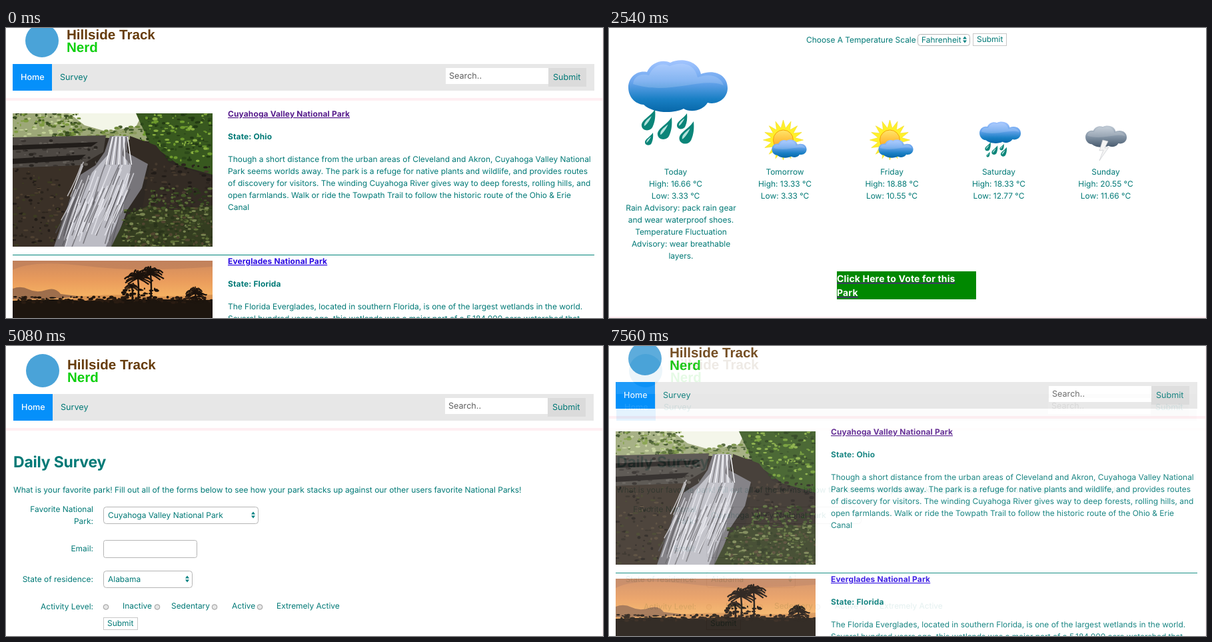
Recreate the animation shown at these times as an HTML page. Size 896 by 435 pixels, loop 7620 ms.

```html
<!DOCTYPE html>
<html lang="en">
<head>
<meta charset="utf-8">
<title>Park pages</title>
<style>
html, body { margin: 0; width: 100%; height: 100%; overflow: hidden; background: #fff; }
svg { display: block; }
text { font: 11.95px Inter, sans-serif; fill: #007976; text-rendering: geometricPrecision; white-space: pre; }
.bold, .link { font-weight: 700; letter-spacing: .15px; }
.link { text-decoration: underline; }
.nav { font-size: 12.6px; }
.brand { font: bold 20.6px "Liberation Sans", Arial, sans-serif; }
.vote { font-size: 14px; font-weight: 700; letter-spacing: .15px; fill: #551a8b; text-decoration: underline; }
.vote tspan { fill: #fff; }
.title { font-size: 23px; font-weight: 700; letter-spacing: -.2px; }
.mid { text-anchor: middle; }
.end { text-anchor: end; }
</style>
</head>
<body>
<svg id="stage" width="896" height="435"></svg>
<script>
let seed = 7;
const random = () => (seed = (seed * 16807) % 2147483647) / 2147483647;
const times = (n, make) => Array.from({ length: n }, (_, i) => make(i)).join('');

const rect = (x, y, w, h, fill, more = '') =>
  `<rect x="${x}" y="${y}" width="${w}" height="${h}" fill="${fill}" ${more}/>`;
const path = (d, fill, more = '') => `<path d="${d}" fill="${fill}" ${more}/>`;
const text = (x, y, s, cls = '', style = '') =>
  `<text x="${x}" y="${y}" class="${cls}" style="${style}"><tspan>${s}</tspan></text>`;
const lines = (x, y, list, cls, step = 18) =>
  list.map((s, i) => text(x, y + i * step, s, cls)).join('');
const place = (x, y, scale, body) =>
  `<g transform="translate(${x} ${y}) scale(${scale})">${body}</g>`;
const gradient = (id, ...stops) =>
  `<linearGradient id="${id}" x2="0" y2="1">${stops.map(([at, color]) =>
    `<stop offset="${at}" stop-color="${color}"/>`).join('')}</linearGradient>`;

// Form parts
const frame = (x, y, w, h, r, color) =>
  rect(x + .5, y + .5, w - 1, h - 1, '#fff', `rx="${r}" stroke="${color}"`);
const button = (x, y, w) => frame(x, y, w, 19, 0, '#c8c8c8') + text(x + 6, y + 13, 'Submit');
const select = (x, y, w, h, label) => frame(x, y, w, h, 4, '#b5b5b5') +
  text(x + (h > 20 ? 7 : 6), y + h / 2 + 4, label) +
  place(x + w - 8, y + h / 2 - .5, 1, path('M-3-1L0-5L3-1ZM-3 1L0 5L3 1Z', 'teal'));

const header = (x, y, right) =>
  `<circle cx="${x + 44}" cy="${y + 19}" r="25" fill="#4aa3d8"/>` +
  text(x + 81, y + 17, 'Hillside Track', 'brand', 'fill:#663c0c') +
  text(x + 81, y + 36, 'Nerd', 'brand', 'fill:#10d010') +
  rect(x, y + 54, right - x, 40, '#e7e7e7') +
  rect(x, y + 54, 59, 40, '#0590fa') +
  text(x + 12, y + 78, 'Home', 'nav', 'fill:#fff;font-weight:500') +
  text(x + 71, y + 78, 'Survey', 'nav') +
  rect(right - 223, y + 60, 154, 24, '#fff') +
  text(right - 218, y + 76, 'Search..', 'nav', 'fill:#606060') +
  rect(right - 69, y + 60, 57, 28, '#dbdbdb') +
  text(right - 62, y + 78, 'Submit', 'nav') +
  rect(0, y + 105, 896, 4, '#ffeef2') + rect(895, 0, 1, 435, '#fff0f3');

// Pictures
const leaves = (n, x, y, w, h, colors) => times(n, i =>
  `<ellipse cx="${(x + random() * w).toFixed(1)}" cy="${(y + random() * h).toFixed(1)}" rx="${(1 + random() * 3).toFixed(1)}" ry="${(.8 + random() * 1.5).toFixed(1)}" fill="${colors[i % colors.length]}"/>`);
const photo = (x, y, h, body) => `<svg x="${x}" y="${y}" width="300" height="${h}">${body}</svg>`;

const waterfall = () => photo(10, 128, 200,
  rect(0, 0, 300, 200, '#2e2823') +
  path('M0 0H205V42L120 35L0 40Z', '#9da878') +
  path('M85 0H195L185 20L140 27L108 18Z', '#f3f6e8') +
  leaves(130, 0, 0, 100, 36, ['#566f2c', '#7f9c40', '#34491d', '#c3d098']) +
  leaves(60, 90, 20, 105, 14, ['#43592a', '#6f8a3a', '#8b9a5c']) +
  path('M185 0H300V92L250 78L205 44Z', '#38581f') +
  leaves(190, 192, 0, 106, 72, ['#6d9a2d', '#2c481a', '#86ad3f', '#233a14']) +
  path('M0 36L140 33L136 58L102 78L0 82Z', '#4d4843') +
  leaves(70, 0, 38, 128, 42, ['#2a2622', '#625d57', '#393430']) +
  path('M0 48L128 43L118 50L0 55ZM0 68L110 62L100 70L0 76Z', '#211d1a') +
  path('M176 34L215 48L235 74L300 96V148L195 140L205 82L174 58Z', '#332b24') +
  leaves(80, 198, 74, 100, 70, ['#211c18', '#463a2e', '#2b241e']) +
  path('M0 82L102 78L78 150L62 200H0Z', '#3a3027') +
  leaves(110, 0, 84, 76, 114, ['#211b17', '#4f4131', '#2b241d', '#3c3b22']) +
  path('M146 34H174L170 58L203 76L194 112L172 145L152 200H62L82 142L102 92L124 78L138 58Z', '#77757a') +
  path('M151 34H171L164 62L178 78L165 145L140 200H78L100 130L119 89L143 62Z', '#bcbcc4') +
  times(60, i => {
    const x = 106 + i * 1.5, y = 70 + random() * 70;
    const lean = (y - 70) * .42;
    return path(`M${x - lean} ${y}q-9 ${18 + random() * 10}-${18 + random() * 6} ${45 + random() * 25}`,
      'none', `stroke="${i % 5 < 3 ? '#f4f5fa' : '#57555a'}" stroke-opacity=".65" stroke-width="1.6"`);
  }) +
  times(9, i => path(`M${150 + i * 2.8} 35l${i * 2 - 10} 42`, 'none',
    `stroke="${i % 2 ? '#77757a' : '#fafafd'}" stroke-width="1.5"`)) +
  path('M300 138L240 145L205 138L172 152L148 200H300Z', '#343d20') +
  leaves(300, 166, 142, 134, 58, ['#5f7038', '#29331a', '#788450', '#514630', '#3d4a25']) +
  leaves(90, 205, 112, 95, 32, ['#435728', '#2a371b', '#5b6b39']));

const palm = (x, y, r, base) =>
  path(`M${x} ${y}Q${x + 2} ${(y + base) / 2} ${x} ${base}`, 'none', 'stroke="#1c130d" stroke-width="2.5"') +
  times(17, i => {
    const a = Math.PI * (.85 + i * 1.3 / 16), reach = r * (.75 + random() * .4);
    const c = Math.cos(a) * reach, s = Math.sin(a) * reach;
    return path(`M${x} ${y}Q${x + c * .6} ${y + s * .8 - 2} ${x + c} ${y + s * .55 + r * .25}`,
      'none', `stroke="#1c130d" stroke-width="${r / 9}"`);
  });

const sunset = () => photo(10, 349, 86,
  rect(0, 0, 300, 86, 'url(#dusk)') +
  path('M0 0H300V9Q190 18 110 8T0 14Z', '#b0775a', 'opacity=".45"') +
  path('M0 42Q12 37 24 43T50 44T72 50L105 54L60 57L0 58Z', '#8a6048', 'opacity=".8"') +
  path('M90 55Q150 48 220 54L300 51V64H90Z', '#b87341', 'opacity=".45"') +
  palm(188, 26, 20, 62) + palm(207, 20, 19, 62) + palm(179, 40, 11, 62) + palm(274, 49, 15, 66) +
  leaves(45, 165, 42, 52, 20, ['#1c130d']) + leaves(20, 262, 50, 28, 12, ['#1c130d']) +
  path('M0 60L60 58L110 60L165 58H215L300 59V86H0Z', '#1d150e') +
  leaves(170, 0, 54, 300, 9, ['#1d150e', '#2a1c12']));

// Weather icons share one cloud
const cloud = fill =>
  path('M52 115C38 114 29 102 29 89C29 74 42 63 57 66C63 52 80 46 92 52C108 44 134 49 138 69C160 61 178 72 178 90C178 106 162 116 148 112C140 125 122 127 112 121C96 129 66 128 52 115Z', `url(#${fill})`) +
  path('M36 84C38 70 50 68 60 71C66 56 80 51 91 57C108 50 128 52 133 74C152 67 168 73 172 86C140 72 90 102 36 84Z', '#fff', 'opacity=".16"');
const drops = [[69, 122, 1], [94, 134, 1.05], [117, 128, .75], [127, 140, 1.07], [66, 157, .6]]
  .map(([x, y, s]) => place(x, y, s,
    path('M0 0C1 10 0 18-3 25C-6 34-19 33-20 25C-21 16-8 12 0 0Z', '#0b8579') +
    path('M-5 10C-13 16-17 20-16 25C-14 24-9 19-5 10Z', '#b5e3dc'))).join('');
const rain = cloud('blue') + drops;
const rays = 'M' + Array.from({ length: 32 }, (_, i) => {
  const a = i * Math.PI / 16, r = i % 2 ? 18 : 30;
  return [Math.sin(a) * r, -Math.cos(a) * r].map(v => v.toFixed(1));
}).join('L') + 'Z';
const sunny = x => place(x, 168, 1,
  path(rays, '#fff02a', 'stroke="#f2dc20" stroke-width=".6"') +
  '<circle r="15" fill="url(#sun)" stroke="#f5a500"/>') +
  place(x - 27.2, 150.5, .35, cloud('blue'));

const parks = () =>
  header(10, 0, 883) + waterfall() + sunset() + rect(10, 340, 873, 1, '#008579') +
  text(333, 133, 'Cuyahoga Valley National Park', 'link', 'fill:#551a8b') +
  text(333, 167, 'State: Ohio', 'bold') +
  lines(333, 201, [
    'Though a short distance from the urban areas of Cleveland and Akron, Cuyahoga Valley National',
    'Park seems worlds away. The park is a refuge for native plants and wildlife, and provides routes',
    'of discovery for visitors. The winding Cuyahoga River gives way to deep forests, rolling hills, and',
    'open farmlands. Walk or ride the Towpath Trail to follow the historic route of the Ohio &amp; Erie',
    'Canal']) +
  text(333, 354, 'Everglades National Park', 'link', 'fill:#2a08e2') +
  text(333, 388, 'State: Florida', 'bold') +
  lines(333, 422, [
    'The Florida Everglades, located in southern Florida, is one of the largest wetlands in the world.',
    'Several hundred years ago, this wetlands was a major part of a 5,184,000 acre watershed that']);

const days = [
  [100, 'Today', '16.66', '3.33'], [264, 'Tomorrow', '13.33', '3.33'], [424.5, 'Friday', '18.88', '10.55'],
  [585, 'Saturday', '18.33', '12.77'], [745.5, 'Sunday', '20.55', '11.66']];
const forecast = () =>
  text(296, 22, 'Choose A Temperature Scale') +
  select(463, 9, 79, 18, 'Fahrenheit') + button(546, 8, 51) +
  rain + sunny(261.5) + sunny(421.5) + place(544, 120.5, .416, rain) +
  place(703, 126.5, .416, cloud('storm')) +
  path('M741 168L736 184L742 183L736 199L750 179L744 180L749 170Z', '#f4f4f4', 'stroke="#c9ccd0" stroke-width=".7"') +
  days.map(([x, day, high, low]) =>
    lines(x, 220, [day, `High: ${high} °C`, `Low: ${low} °C`], 'mid')).join('') +
  lines(108, 274, ['Rain Advisory: pack rain gear', 'and wear waterproof shoes.',
    'Temperature Fluctuation', 'Advisory: wear breathable', 'layers.'], 'mid') +
  rect(342, 365, 209, 42, '#008800') +
  lines(342, 381, ['Click Here to Vote for this', 'Park'], 'vote', 21) +
  rect(0, 433, 896, 2, '#ffeef2');

const levels = [[150, 175, 'Inactive'], [227, 248, 'Sedentary'], [313, 339, 'Active'], [381, 406, 'Extremely Active']];
const survey = () =>
  header(11, 18, 882) +
  text(11, 182, 'Daily Survey', 'title') +
  text(11, 220, 'What is your favorite park! Fill out all of the forms below to see how your park stacks up against our other users favorite National Parks!') +
  lines(131, 249, ['Favorite National', 'Park:'], 'end') +
  select(146, 241, 233, 26, 'Cuyahoga Valley National Park') +
  text(131, 308, 'Email:', 'end') + frame(146, 291, 141, 27, 3, '#b5b5b5') +
  text(131, 354, 'State of residence:', 'end') + select(146, 337, 134, 26, 'Alabama') +
  text(131, 395, 'Activity Level:', 'end') +
  levels.map(([dot, x, label]) =>
    `<circle cx="${dot}" cy="391.5" r="3.8" fill="#e6e6e6" stroke="#999"/>` + text(x, 394, label)).join('') +
  button(146, 407, 52);

const scene = (id, body) => `<g id="${id}">${rect(0, 0, 896, 435, '#fff')}${body()}</g>`;
stage.innerHTML = '<defs>' +
  gradient('blue', [0, '#a3c5ff'], [.4, '#6ca6ee'], [.75, '#197fc4'], [1, '#0767a8']) +
  gradient('storm', [0, '#c0cad5'], [.5, '#8595a6'], [1, '#46596d']) +
  gradient('sun', [0, '#ffe66a'], [1, '#ff9d13']) +
  gradient('dusk', [0, '#cf8a5e'], [.35, '#ea9c5c'], [.6, '#f4b062'], [1, '#d9853f']) +
  '</defs>' + scene('parksPage', parks) + scene('forecastPage', forecast) + scene('surveyPage', survey);

// Each page holds for 2 s, then the next one blends in by tenths every 60 ms
const HOLD = 2000, STEP = 60, SPAN = 2540, LOOP = 7620;
const start = performance.now();
function draw() {
  const t = Math.max(0, performance.now() - start) % LOOP;
  const page = Math.floor(t / SPAN), rest = t % SPAN;
  const mix = rest < HOLD ? 0 : (Math.floor((rest - HOLD) / STEP) + 1) / 10;
  forecastPage.style.opacity = [mix, 1, 0][page];
  surveyPage.style.opacity = [0, mix, 1 - mix][page];
  requestAnimationFrame(draw);
}
draw();
</script>
</body>
</html>
```
